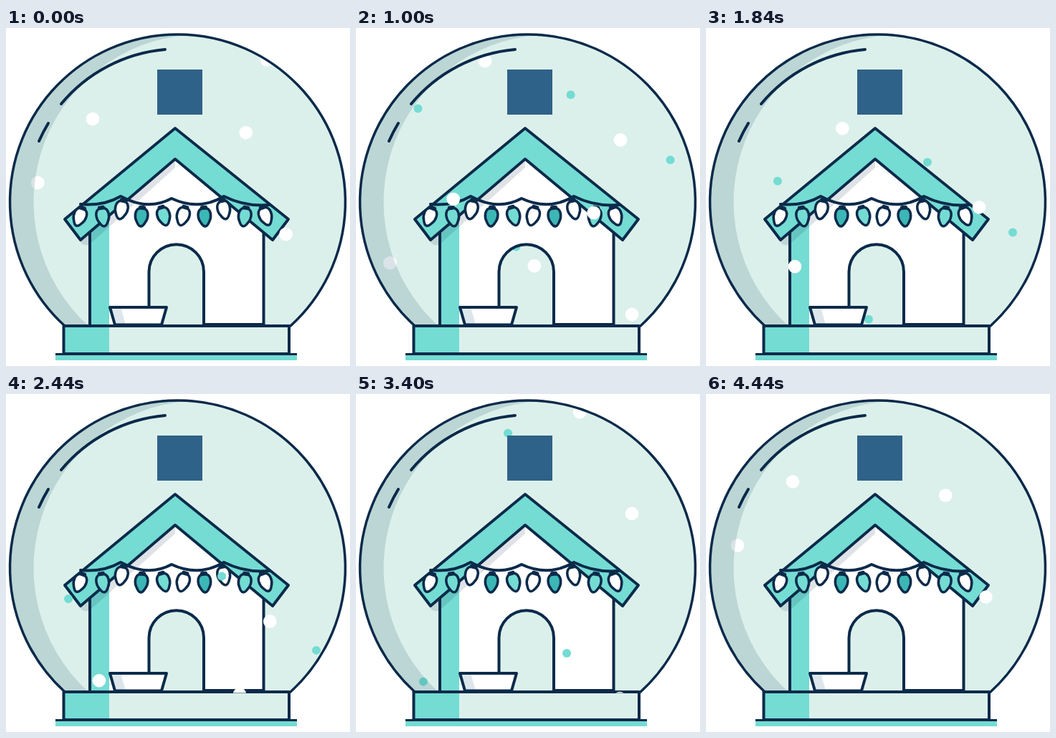
An HTML page for the animation above (4480 ms loop, 480 px wide and 472 px high).

```html
<!DOCTYPE html>
<html lang="en">
<head>
<meta charset="utf-8">
<title>Snow globe</title>
<style>
  html, body { margin: 0; width: 100%; height: 100%; overflow: hidden; background: #fff; }
  svg { display: block; width: 480px; height: 472px; }
  .line { stroke: #0b2a4a; stroke-width: 4; stroke-linejoin: round; stroke-linecap: round; }
  .none { fill: none; }
  .white { fill: #fff; }
  .glass { fill: #dcf0eb; }
  .teal { fill: #74dcd3; }
  .deep { fill: #3cb7b6; }
  .navy { fill: #0b2a4a; }
</style>
</head>
<body>
<svg viewBox="0 0 480 472">
  <defs>
    <path id="globe" d="M82 416A234 234 0 1 1 397 416"/>
    <clipPath id="inside"><path d="M82 416A234 234 0 1 1 397 416V417.500H82Z"/></clipPath>
  </defs>

  <use href="#globe" class="glass"/>
  <g id="back" clip-path="url(#inside)"></g>

  <g id="house">
    <path class="white" fill-rule="evenodd"
      d="M117 414V282L236 184L359 286V414ZM199.500 414V340.500A38.250 38.250 0 0 1 276 340.500V414Z"/>
    <path class="teal" d="M117 414V282L144 262V414Z"/>
    <path fill="#0b2a4a" fill-opacity=".13" d="M236 183V195L118 301Q109 307 102 297Z"/>
    <path class="line none" d="M117 414V284M359.500 284V414H276M199.500 414V340.500A38.250 38.250 0 0 1 276 340.500V414"/>
    <path class="line teal" d="M236 140L394 267L372 296L236 183L104 296L82 267Z"/>
    <path class="line none" d="M104 246Q136 249 160 235Q198 256 231 238Q269 256 304 235Q334 250 367 247"/>
    <g id="bulbs"></g>
    <path class="white" d="M145 390H224L217 414.500H152Z"/>
    <path fill="#dde7eb" d="M146 390H160L167 414H152Z"/>
    <path class="line none" d="M145 390H224L217 414.500H152Z"/>
  </g>
  <rect x="211" y="58" width="63" height="63" fill="#2f6288"/>

  <rect class="glass" x="80" y="416" width="315" height="39"/>
  <rect class="teal" x="80" y="416" width="64" height="39"/>
  <rect class="teal" x="69" y="455" width="337" height="9"/>
  <path class="line none" d="M80.500 416H395V455H80.500Z"/>
  <path class="line none" style="stroke-width:3;stroke-linecap:butt" d="M69 455.500H406"/>

  <g clip-path="url(#inside)">
    <g id="front"></g>
    <path fill="#08465a" fill-opacity=".15" fill-rule="evenodd"
      d="M0 0H274V416H0ZM274 9A234 234 0 0 0 115 416H274Z"/>
  </g>
  <use href="#globe" class="line none" style="stroke-width:3.5"/>
  <path class="line none" d="M222 30A213 213 0 0 0 77 106M59 133A212 212 0 0 0 46 158"/>
</svg>
<script>
const LOOP = 4480;
const $ = id => document.getElementById(id);

function add(parent, tag, attrs) {
  const el = document.createElementNS('http://www.w3.org/2000/svg', tag);
  for (const k in attrs) el.setAttribute(k, attrs[k]);
  parent.appendChild(el);
  return el;
}

// x, y, tilt, fill
const bulbs = [
  [103, 263, 20, 'white'], [135, 263, -10, 'teal'], [161, 253, 12, 'white'],
  [189, 263, 5, 'deep'], [220, 262, -16, 'teal'], [247, 262, 16, 'white'],
  [277, 263, -5, 'deep'], [304, 253, -12, 'white'], [333, 263, 10, 'teal'],
  [362, 262, -20, 'white']
];
for (const [x, y, tilt, fill] of bulbs) {
  const g = add($('bulbs'), 'g', { transform: `translate(${x} ${y}) rotate(${tilt})` });
  add(g, 'path', {
    class: 'line ' + fill, style: 'stroke-width:3.5',
    d: 'M-4 -11C-10 -8 -10 2 -6 8C-4 12 -2 14 0 14C2 14 4 12 6 8C10 2 10 -8 4 -11Z'
  });
  add(g, 'rect', { class: 'navy', x: -5, y: -15, width: 10, height: 5, rx: 2 });
}

// layer, colour, time at the top edge, fall speed, [y, x] along the path
const SLOW = .112, FAST = .1205;
const flakes = [
  ['front', 'white', -1134, SLOW, [[127, 121], [199, 130], [275, 138], [333, 124], [401, 130]]],
  ['front', 'white', -1304, SLOW, [[25, 312], [144, 334.5], [218, 333], [418, 326]]],
  ['front', 'white', -1929, SLOW, [[212, 44], [288, 49], [364, 45]]],
  ['front', 'white', -2571, SLOW, [[59, 398], [167, 385], [286, 390.5], [360, 385]]],
  ['front', 'white', -396, SLOW, [[44, 364], [116, 361], [193, 377], [251, 381], [319, 368]]],
  ['back', 'white', 588, SLOW, [[82, 180], [144, 191]]],
  ['back', 'white', -1966, SLOW, [[99, 240], [292, 246], [368, 252]]],
  ['front', 'teal', 167, SLOW, [[53, 304], [129, 298], [188, 309], [255, 301], [363, 294]]],
  ['front', 'teal', -530, FAST, [[141, 433], [223, 441], [286, 428], [358, 433]]],
  ['front', 'teal', 67, FAST, [[70, 74], [151, 96], [213, 100], [286, 87], [401, 94]]],
  ['back', 'teal', -1535, FAST, [[57, 212], [344, 225], [407, 227]]]
].map(([layer, fill, start, speed, path]) => ({
  start, speed, path,
  el: add($(layer), 'circle', { class: fill, r: fill === 'white' ? 9.3 : 6 })
}));

// Smooth curve through the path points, flat beyond its ends
function sway(p, y) {
  const n = p.length - 1;
  if (y <= p[0][0]) return p[0][1];
  if (y >= p[n][0]) return p[n][1];
  let i = 0;
  while (y > p[i + 1][0]) i++;
  const slope = k => {
    const a = p[Math.max(k - 1, 0)], b = p[Math.min(k + 1, n)];
    return (b[1] - a[1]) / (b[0] - a[0]);
  };
  const h = p[i + 1][0] - p[i][0], s = (y - p[i][0]) / h, r = 1 - s;
  return r * r * (1 + 2 * s) * p[i][1] + s * s * (3 - 2 * s) * p[i + 1][1]
    + h * s * r * (r * slope(i) - s * slope(i + 1));
}

let origin;
function draw(now) {
  origin ??= now;
  const t = Math.max(0, Math.floor((now - origin) % LOOP / 40) * 40);
  for (const f of flakes) {
    const y = (t - f.start + LOOP) % LOOP * f.speed;
    f.el.setAttribute('cx', sway(f.path, y).toFixed(2));
    f.el.setAttribute('cy', y.toFixed(2));
  }
  requestAnimationFrame(draw);
}
draw(performance.now());
</script>
</body>
</html>
```
